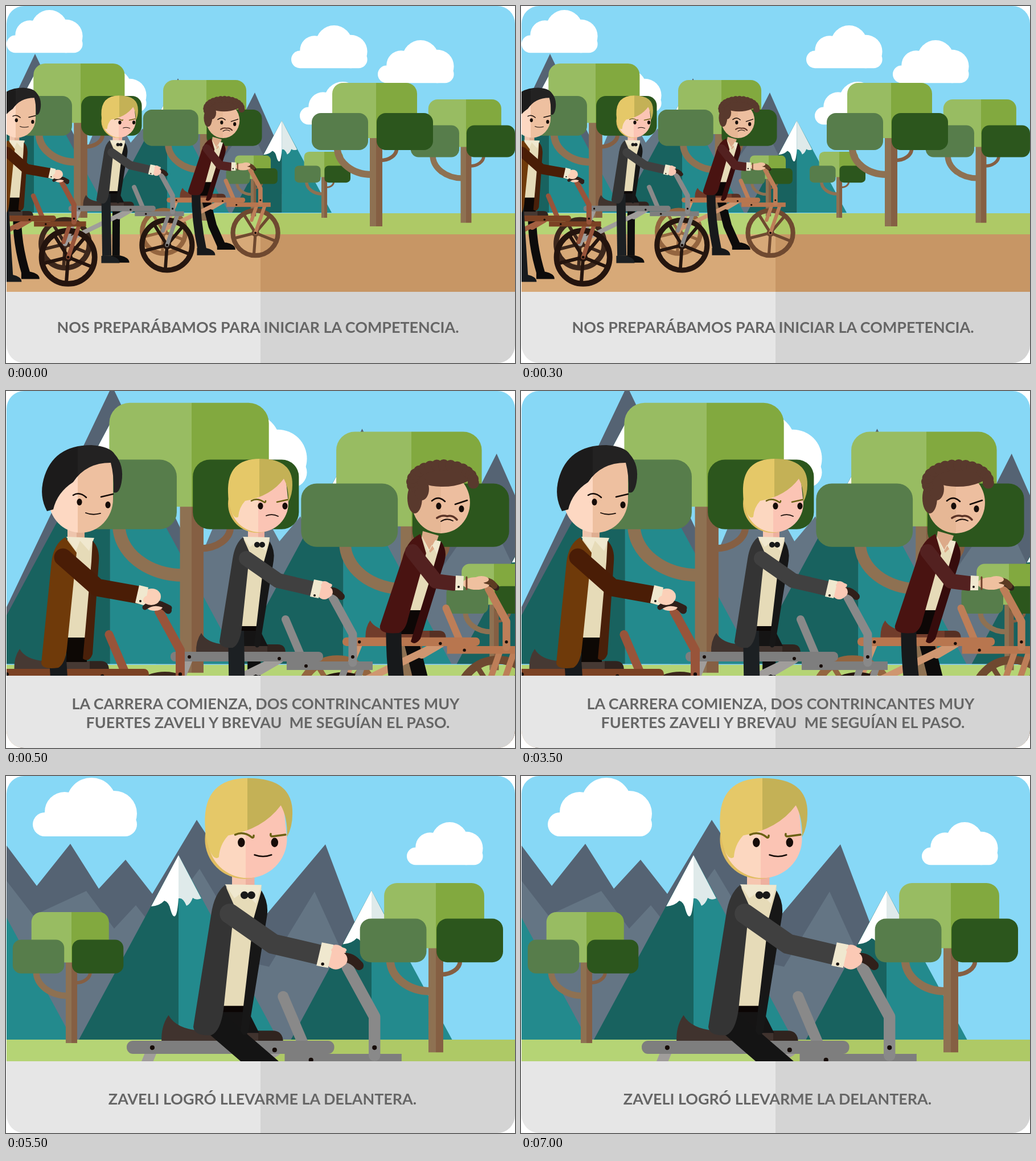
Animation, 894 px wide and 627 px high, one loop 8 s. Source, as an HTML page:

```html
<!DOCTYPE html>
<html lang="es">
<head>
<meta charset="utf-8">
<title>La carrera</title>
<style>
html, body { margin: 0; width: 100%; height: 100%; overflow: hidden; background: #fff; }
svg { display: block; width: 100vw; height: 100vh; }
text { font: 700 26.9px Lato, sans-serif; fill: #666; text-anchor: middle; white-space: pre; }
.scene { visibility: hidden; animation: 8s step-end infinite; }
#start { animation-name: start; }
#chase { animation-name: chase; }
#lead { animation-name: lead; }
@keyframes start { 0% { visibility: visible } 6.25%, 100% { visibility: hidden } }
@keyframes chase { 0% { visibility: hidden } 6.25% { visibility: visible } 68.75%, 100% { visibility: hidden } }
@keyframes lead { 0% { visibility: hidden } 68.75%, 100% { visibility: visible } }
</style>
</head>
<body>
<svg id="stage" viewBox="0 0 894 627" preserveAspectRatio="none"></svg>
<script>
const defs = [];

// Two flat tones meeting at x
function split(x, left, right) {
  const id = 'tone' + defs.length;
  defs.push(`<linearGradient id="${id}" gradientUnits="userSpaceOnUse" x1="${x}" x2="${x + .01}" y1="0" y2="0">
    <stop stop-color="${left}"/><stop offset="1" stop-color="${right}"/></linearGradient>`);
  return `url(#${id})`;
}
const path = (d, fill) => `<path d="${d}" fill="${fill}"/>`;
const line = (d, color, width, cap = 'round') =>
  `<path d="${d}" fill="none" stroke="${color}" stroke-width="${width}" stroke-linecap="${cap}" stroke-linejoin="round"/>`;
const rect = (x, y, w, h, fill, r = 0) =>
  `<rect x="${x}" y="${y}" width="${w}" height="${h}" rx="${r}" fill="${fill}"/>`;
const oval = (x, y, rx, ry, fill) => `<ellipse cx="${x}" cy="${y}" rx="${rx}" ry="${ry}" fill="${fill}"/>`;
const disc = (x, y, r, fill) => oval(x, y, r, r, fill);
const put = (id, x, y, s) => `<use href="#${id}" transform="translate(${x} ${y}) scale(${s})"/>`;
const group = (transform, content) => `<g transform="${transform}">${content}</g>`;
const define = (id, content) => defs.push(`<g id="${id}">${content}</g>`);

const SHIRT = '#e6dbb8', COLLAR = '#f0e8cf', INK = '#160c08';

define('cloud', disc(103, 44, 44, '#fff') + disc(143, 63, 40, '#fff') + disc(56, 60, 35, '#fff') + rect(0, 61, 183, 42, '#fff', 21));

define('peak', path('M0 0L-175 324H0Z', '#18625f') + path('M0 0L175 324H0Z', '#238a8d'));
define('snow',
  path('M0 0L-48 90Q-33 89-25 80Q-17 82-14 96Q-10 110-6 107Q-2 104 0 76Z', '#fff') +
  path('M0 0V76Q8 74 14 89Q21 86 25 75Q31 80 40 76Z', '#dfeaea'));
const mountain = (x, y, s, snow) => put('peak', x, y, s) + put('snow', x, y, snow);

define('tree',
  line('M-8 161A60 47 0 0 1-68 114', '#8e7152', 12) + line('M8 136A28 20 0 0 0 36 116', '#855f43', 6.5) +
  rect(-11, 90, 22, 162, split(0, '#8e7152', '#855f43')) +
  rect(-77, 0, 149, 97, split(0, '#98bc62', '#82a93f'), 19) +
  rect(-113, 53, 99, 65, '#577d4b', 16) + rect(1, 53, 99, 65, '#2c561d', 16));

function wheel(x, y, r, color) {
  let spokes = '';
  for (let a = -50; a < 310; a += 72) {
    const turn = a * Math.PI / 180;
    spokes += `M${x} ${y}l${(r - 8) * Math.cos(turn)} ${(r - 8) * Math.sin(turn)}`;
  }
  return `<circle cx="${x}" cy="${y}" r="${r - 8}" fill="none" stroke="${color}" stroke-width="16"/>` +
    line(spokes, color, 10) + disc(x, y, 13, color);
}

// Drawn around the bend of the handlebar post
function bike(x, y, s, c) {
  return group(`translate(${x} ${y}) scale(${s})`,
    wheel(-330, 150, 82, c.rear) +
    line('M-287 44L-330 150M-129 45L-325 140', c.pale, 14) +
    wheel(-17, 154, 85, c.front) +
    line('M16 58L-17 154M-12 58L-30 110', c.frame, 12) + disc(-17, 154, 4, INK) +
    path('M-275 35Q-276 14-266 0Q-256 18-225 20H-132Q-118 20-118 35Z', split(-150, c.seat, c.seatDark)) +
    line('M-118-24L-90 42', c.frame, 14) +
    rect(-116, 50, 151, 15, c.bar) + line('M-129 45L-165 66', c.pale, 17) +
    rect(-320, 33, 268, 17, c.bar, 8) +
    line('M-35-62L0 2V52', c.frame, 15) +
    line('M-36-74Q-27-72-20-64', '#30201a', 12) +
    disc(-287, 42, 3, INK) + disc(-129, 45, 3, INK) + disc(-82, 58, 3, INK) + disc(0, 42, 3, INK));
}

const leg = (d, x, y, color, width) =>
  line(d, color, width, 'butt') + path(`M${x - 14} ${y - 16}h28q28 6 28 22h-56z`, color);

function features(x1, y1, x2, y2, brow, browPath, mouth) {
  return oval(x1, y1, 4.6, 6, INK) + oval(x2, y2, 4.6, 6, INK) + line(browPath, brow, 2.6) + line(mouth, INK, 1.8);
}

const cuff = (d, x, y) => path(d, COLLAR) + disc(x, y, 2, INK);

function darkRider() {
  const skin = split(126, '#fdd8c2', '#eec0a0');
  return leg('M132 480Q128 570 160 672', 158, 677, '#0d0b0b', 26) +
    bike(306, 453, 1.06, { frame: '#98543a', bar: '#7b4224', pale: '#a35f40', front: '#24140e', rear: '#38231a', seat: '#463933', seatDark: '#30241f' }) +
    leg('M90 455L104 682', 103, 686, '#171a1d', 30) +
    rect(106, 432, 36, 44, '#0d0805') +
    rect(108, 236, 30, 32, split(124, '#eec5ad', '#dfae91')) +
    path('M108 258H152L154 290L139 433H105Z', SHIRT) +
    path('M106 256L123 281L130 263L146 281L155 258Z', COLLAR) +
    path('M104 257Q84 268 80 300L62 478Q64 490 92 486Q104 479 107 452L124 284Z', '#6f3a0a') +
    path('M152 263Q165 276 163 300L152 462Q146 478 135 470L150 300Z', '#49200a') +
    line('M100 292L160 345L238 359', '#4a1d06', 31) +
    oval(256, 361, 16, 14, '#fbd0b8') + oval(261, 379, 14, 7, '#fbd0b8') +
    cuff('M227 372L234 341L250 345L244 377Z', 236, 369) +
    line('M244 380Q262 366 287 381', '#30201a', 9) + oval(255, 367, 14, 9, '#fbd0b8') +
    path('M75 190L110 122H188V190A56.5 59 0 0 1 75 190Z', skin) +
    path('M72 211Q58 185 66 155Q82 95 150 95Q182 97 191 111Q208 130 203 160Q199 182 189 178Q190 148 184 126Q140 126 118 160Q90 178 83 208Z', split(126, '#1c1b1b', '#232222')) +
    features(129, 195, 179, 200, INK, 'M118 183Q129 176 141 187M167 186L188 181', 'M140 214Q152 219 166 215');
}

function blondRider(leading) {
  const skin = split(443, '#fcd7c0', '#fbc4b4');
  const face = leading
    ? features(437, 202, 480, 202, '#6b6114', 'M429 192Q440 187 450 195Q453 197 453 193M475 191Q474 195 479 194L494 192', 'M454 218Q465 222 476 218')
    : features(447, 202, 490, 202, '#6b6114', 'M431 193Q441 187 453 195Q456 197 456 193M476 195L494 191', 'M457 219Q468 215 478 220');
  const farLeg = leading ? '' : leg('M436 425L435 612', 434, 627, '#0e0e0e', 23);
  const nearLeg = leading ? line('M402 434L474 496', '#141414', 32) : leg('M404 420L407 612', 404, 628, '#1c2023', 28);
  return farLeg +
    bike(609, 425, 1, { frame: '#898989', bar: '#7e7e7e', pale: '#a09d9b', front: '#25160f', rear: '#3c271c', seat: '#40332e', seatDark: '#30241f' }) +
    path('M412 420H446L460 448H408Z', '#151414') + nearLeg +
    rect(425, 240, 29, 28, split(443, '#f6c6b0', '#eeb09f')) +
    path('M418 257H463L462 280L446 414H412Z', SHIRT) + rect(412, 413, 34, 8, '#0b0504') +
    path('M416 256L428 274L440 265L456 281L463 257Z', COLLAR) +
    path('M416 257Q402 268 398 295L375 440Q376 452 398 451Q410 446 414 418L428 284Z', '#343434') +
    path('M463 264Q473 280 470 298L446 447Q440 455 436 445L453 300Z', '#171717') +
    disc(441, 270, 5, '#191919') + disc(450, 270, 5, '#191919') +
    line('M422 294L478 333L538 347', '#404040', 26) +
    oval(559, 350, 14, 16, '#fbc9b5') +
    cuff('M534 361L541 331L556 334L549 364Z', 542, 359) + oval(563, 341, 10, 4, '#fbc9b5') +
    line('M572 350Q582 351 589 361', '#30201a', 11) + oval(566, 353, 8, 9, '#fbc9b5') +
    disc(441, 198, 51, '#e0bd60') +
    path('M394 197L420 140H490L496 197A51 51 0 0 1 394 197Z', skin) +
    path('M390 178Q388 119 446 119Q504 119 503 165Q503 182 496 195Q497 170 488 154Q465 185 420 193Q409 205 408 221Q402 226 396 212Q390 195 390 178Z', split(445, '#e5c868', '#c4b156')) +
    face;
}

function curlyRider() {
  const hair = '#59392d', skin = split(764, '#e6b795', '#edbe9f');
  let curls = '';
  for (let i = 0; i < 16; i++) {
    const a = (168 + i * 13) * Math.PI / 180;
    curls += disc(767 + 54 * Math.cos(a), 160 + 30 * Math.sin(a), 10, hair);
  }
  return leg('M708 425L732 520L758 578', 760, 587, '#0d0b0b', 26) +
    bike(879, 403, .9, { frame: '#bd7e58', bar: '#b8764f', pale: '#cf9670', front: '#6f4930', rear: '#94653f', seat: '#713c2b', seatDark: '#573023' }) +
    path('M702 380H736L724 427H690Z', '#0d0706') +
    leg('M681 415Q680 500 700 594', 698, 604, '#17191b', 27) +
    path('M732 246L760 254L748 290L728 270Z', '#dcaa89') +
    path('M730 256L745 284L764 266L736 385H706Z', SHIRT) +
    path('M729 252L742 282L748 270L758 288L764 264L754 262L744 280Z', COLLAR) +
    path('M728 251Q704 262 696 295L657 412Q654 428 690 425Q702 420 706 400L738 285Z', '#491311') +
    path('M764 264Q776 280 770 300L728 435Q718 448 711 440L742 340Z', '#360c0c') +
    line('M714 282L755 334L786 338', '#532120', 26) +
    oval(826, 338, 24, 11, '#efc09f') +
    cuff('M789 350L790 324L804 325L803 350Z', 795, 344) + line('M809 327V348', '#71402b', 3) +
    line('M843 333Q852 334 858 342', '#5c3a22', 11) + oval(835, 331, 13, 6, '#efc09f') +
    oval(764, 196, 51, 54, skin) +
    oval(767, 147, 52, 21, hair) + oval(718, 188, 13, 27, hair) + oval(730, 172, 13, 20, hair) + curls +
    features(760, 202, 800, 207, INK, 'M748 193Q760 183 771 194M789 199L810 192', 'M764 229Q774 222 785 228') +
    line('M757 223Q766 217 775 220Q784 217 792 226', '#5a3326', 3.6);
}

const closeUp = 'matrix(1.75 0 0 1.75 97 -156)';
const wide = 'matrix(.5714 0 0 .5714 -55.43 89.14)';

define('world',
  rect(-60, -60, 960, 430, '#87d8f6') +
  put('cloud', 1, 7, .73) + put('cloud', 501, 34, .73) + put('cloud', 653, 60, .73) + put('cloud', 516, 133, .73) +
  path('M-82 363L51 84L185 363ZM185 363L302 127L420 363ZM330 363L437 152L530 363Z', '#556373') +
  path('M95 363L178 165L219 240L240 215L302 363ZM290 363L330 195L380 270L425 205L500 363Z', '#647584') +
  put('cloud', 113, 111, .73) +
  mountain(49, 122, .744, .9) + mountain(283, 162, .62, .68) + mountain(484.5, 201, .5, .67) +
  rect(-60, 364, 960, 40, split(447, '#b5d475', '#aec966')) +
  rect(-60, 401, 960, 120, split(447, '#d7a978', '#c79665')) +
  put('tree', 131, 101, 1.075) + put('tree', 351.5, 130, .98) + put('tree', 434.5, 262.5, .424) +
  put('tree', 559, 256, .46) + put('tree', 808, 164, .86) + put('tree', 650, 135, 1) +
  group(wide, curlyRider() + blondRider(false) + darkRider()));

const leadView =
  rect(0, 0, 894, 520, '#87d8f6') + put('cloud', 47, 3, 1) + put('cloud', 704, 81, .73) +
  path('M0 121L54 193L113 119L163 198L210 147L257 207L335 77L450 252L561 120L690 463H0Z', '#556373') +
  path('M0 183L48 245L141 202L190 268L228 227L262 270L340 163L440 330L462 335L542 203L660 463H0Z', '#647584') +
  path('M0 247L117 463H0Z', '#238a8d') +
  mountain(303, 139, 1, 1) + mountain(642, 201, .81, 1.05) +
  rect(0, 463, 894, 60, split(447, '#b5d475', '#aec966')) +
  put('tree', 115, 239, .913) + put('tree', 755, 188, 1.18) +
  group('matrix(1.36 0 0 1.36 -181 -158)', blondRider(true));

const panelTone = split(446.5, '#e6e6e6', '#d4d4d4');
const caption = (top, ...rows) => rect(0, top, 894, 130, panelTone) +
  rows.map(([x, y, words]) => `<text x="${x}" y="${y}">${words}</text>`).join('');
const scene = (id, view, words) => `<g id="${id}" class="scene">${view}${words}</g>`;

const scenes =
  scene('start', '<use href="#world"/>',
    caption(502, [442.5, 574, 'NOS PREPARÁBAMOS PARA INICIAR LA COMPETENCIA.'])) +
  scene('chase', `<use href="#world" transform="${closeUp}"/>`,
    caption(500, [456, 558.5, 'LA CARRERA COMIENZA, DOS CONTRINCANTES MUY'],
      [460, 591.5, 'FUERTES ZAVELI Y BREVAU  ME SEGUÍAN EL PASO.'])) +
  scene('lead', leadView,
    caption(501, [450.5, 577, 'ZAVELI LOGRÓ LLEVARME LA DELANTERA.']));

document.getElementById('stage').innerHTML =
  `<defs>${defs.join('')}<clipPath id="card"><rect x="1" width="893" height="627" rx="31"/></clipPath></defs>
  <g clip-path="url(#card)">${scenes}</g>`;
</script>
</body>
</html>
```
